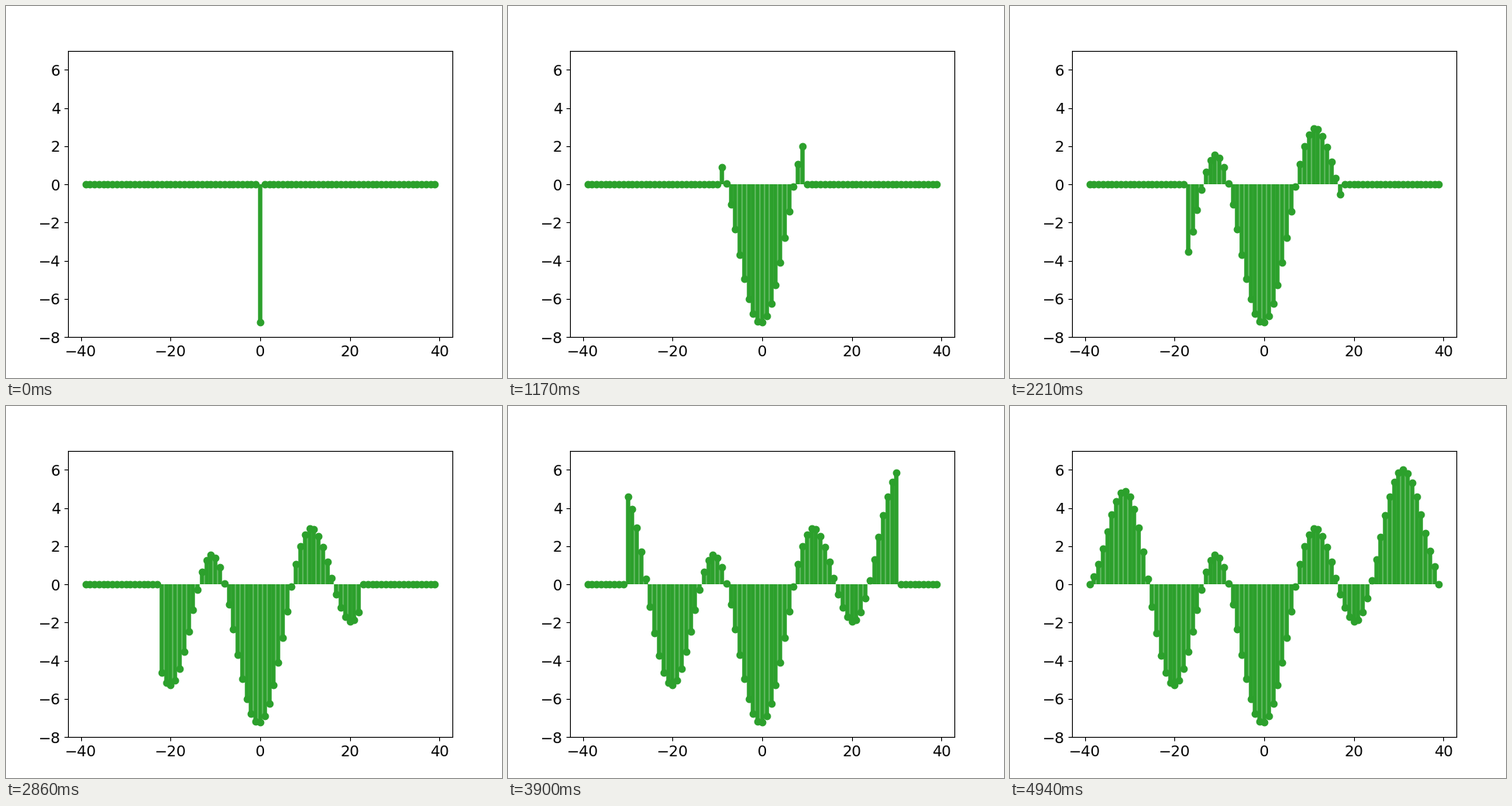
A matplotlib script for the animation above (5070 ms loop, 640x480 px).

```python
import matplotlib.pyplot as plt
import numpy as np
from matplotlib.animation import FuncAnimation

REACH = 39
STEP = 3
GREEN = "#2ca02c"

# Curve heights every STEP units, from -42 to 42
KNOTS = np.array([
    -0.2, -0.05, 1.88, 4.35, 4.60, 1.71, -2.56, -5.15, -4.42, -1.34,
    1.27, 0.90, -2.35, -6.01, -7.22, -5.28, -1.42, 2.00, 2.88, 1.18,
    -1.22, -1.86, 0.21, 3.62, 5.85, 5.32, 2.69, 0.35, 0.0,
])


def spline(x, x0, h, y):
    """Natural cubic spline through evenly spaced knots."""
    n = len(y) - 2
    system = 4 * np.eye(n) + np.eye(n, k=1) + np.eye(n, k=-1)
    bend = np.zeros(n + 2)
    bend[1:-1] = np.linalg.solve(system, 6 * np.diff(y, 2) / h**2)
    i = np.clip((x - x0) // h, 0, n).astype(int)
    t = (x - x0) / h - i
    s = 1 - t
    return (s * y[i] + t * y[i + 1]
            + h**2 / 6 * ((s**3 - s) * bend[i] + (t**3 - t) * bend[i + 1]))


lags = np.arange(-REACH, REACH + 1)
curve = spline(lags, -42, STEP, KNOTS)

plt.rcParams["font.size"] = 14
fig, ax = plt.subplots(figsize=(6.4, 4.8), dpi=100)
markers, stems, _ = ax.stem(lags, np.zeros(len(lags)), basefmt=" ")
markers.set_color(GREEN)
stems.set(color=GREEN, linewidth=4)
ax.set_xlim(-42.9, 42.9)
ax.set_ylim(-8, 7)
ax.set_xticks(range(-40, 41, 20))
ax.set_yticks(range(-8, 7, 2))


def draw(k):
    y = np.where(np.abs(lags) <= k, curve, 0)
    markers.set_ydata(y)
    stems.set_segments([[(x, 0), (x, v)] for x, v in zip(lags, y)])
    return markers, stems


anim = FuncAnimation(fig, draw, frames=REACH, interval=130,
                     repeat=True, repeat_delay=0)
plt.show()
```
